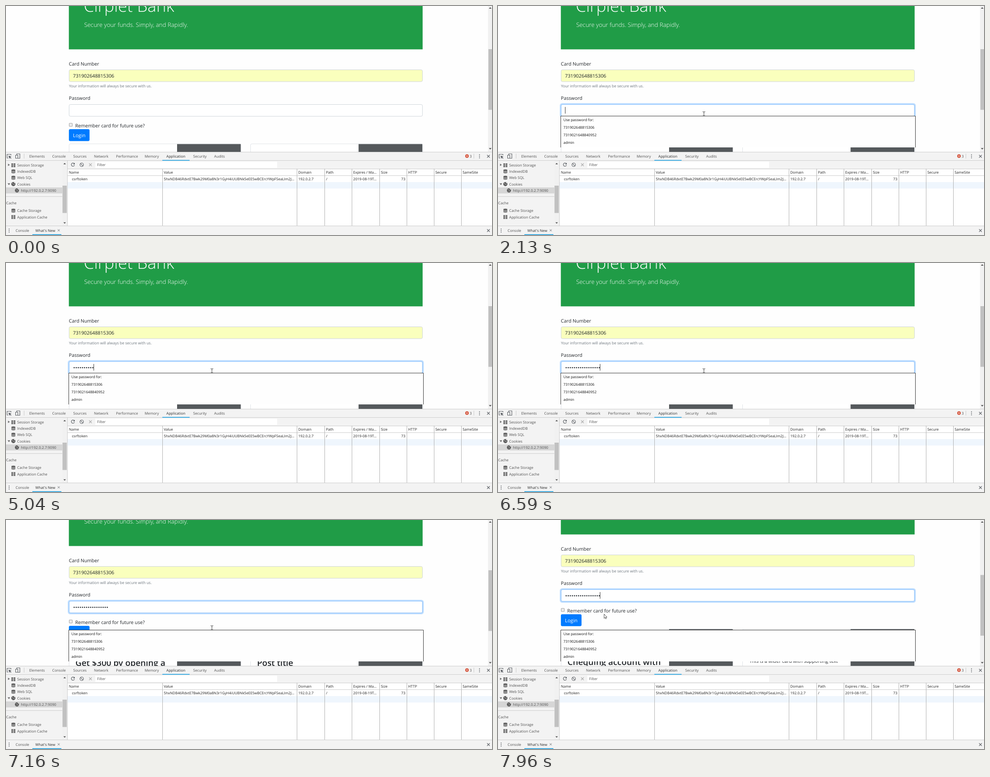
An HTML page that plays this animation: 1088 by 515 pixels, repeating every 8000 ms.

```html
<!DOCTYPE html>
<html lang="en">
<head>
<meta charset="utf-8">
<title>Login page with developer tools</title>
<style>
html, body { margin: 0; width: 100%; height: 100%; overflow: hidden; background: #fefefe; }
svg { display: block; width: 100vw; height: 100vh; font-family: "Open Sans", "Noto Sans", sans-serif; }
text { white-space: pre; text-rendering: geometricPrecision; }
.body { font-size: 10.7px; fill: #212529; }
.input { font-size: 10.75px; fill: #212529; }
.help { font-size: 8.53px; fill: #6c757d; }
.hero { font-weight: 300; fill: #fff; }
.title { font-size: 18.9px; font-weight: 600; fill: #212529; }
.field { fill: #fff; stroke: #ced4da; }
.card { fill: #fff; stroke: #dee2e6; }
.thumb { fill: #55595c; }
.bar { fill: #c1c1c1; }
.track { fill: #f1f1f1; }
.tri { fill: #505050; }
.panel { fill: #f3f3f3; }
.rule { stroke: #ccc; }
.icon { fill: none; stroke: #5f6368; stroke-width: 1.2; }
.tool { font-size: 8.14px; fill: #505050; }
.cell { font-size: 8.06px; fill: #222; }
.menu { font-size: 8.1px; fill: #111; }
.on { fill: #2a2a2a; }
.accent { fill: #1a9fe0; }
</style>
</head>
<body>
<svg viewBox="0 0 1088 515" preserveAspectRatio="none">
  <defs>
    <path id="store" fill="#5a5a5a" d="M0 2a4.5 1.8 0 0 1 9 0a4.5 1.8 0 0 1-9 0M0 3.3q4.5 2.6 9 0v1.6q-4.5 2.6-9 0zM0 6q4.5 2.6 9 0v1.7q-4.5 2.6-9 0z"/>
    <path id="grid" fill="#5a5a5a" d="M0 0h4v2.2h-4zM5 0h4v2.2h-4zM0 3h4v2.2h-4zM5 3h4v2.2h-4zM0 6h4v2.2h-4zM5 6h4v2.2h-4z"/>
    <g id="cookie">
      <circle cx="4.5" cy="4.5" r="4.5" fill="#4a4a4a"/>
      <g fill="#f3f3f3"><circle cx="3" cy="3" r=".9"/><circle cx="6" cy="5.6" r="1"/><circle cx="3" cy="6.3" r=".8"/><circle cx="6.8" cy="1.8" r="1.1"/></g>
    </g>
    <path id="close" d="M-3-3L3 3M3-3L-3 3"/>
    <g id="dots" fill="#5f6368"><circle cy="-3.6" r="1"/><circle r="1"/><circle cy="3.6" r="1"/></g>
  </defs>

  <rect width="1088" height="328" fill="#fefefe"/>
  <g id="page">
    <rect x="140.7" y="-120" width="792" height="217.5" fill="#209c47"/>
    <text class="hero" x="174" y="13" font-size="37.3">Cirplet Bank</text>
    <text class="hero" x="175" y="47" font-size="13.35">Secure your funds. Simply, and Rapidly.</text>

    <text class="body" x="140.8" y="133.5">Card Number</text>
    <rect class="field" x="141.3" y="143.5" width="791" height="26.5" rx="3" style="fill:#faffbd"/>
    <text class="input" x="150" y="161.3">731902648815306</text>
    <text class="help" x="141" y="183.3">Your information will always be secure with us.</text>

    <text class="body" x="140.8" y="211.3">Password</text>
    <rect class="field" x="141.3" y="221.5" width="791" height="26.5" rx="3"/>
    <g id="focus">
      <rect x="139.8" y="220" width="794" height="29.5" rx="4" fill="none" stroke="#bfdeff" stroke-width="3"/>
      <rect x="141.3" y="221.5" width="791" height="26.5" rx="3" fill="none" stroke="#80bdff"/>
    </g>
    <line id="typed" x1="152.6" y1="235.4" y2="235.4" stroke="#343a40" stroke-width="2.9" stroke-linecap="round" stroke-dasharray="0 4.63"/>
    <rect id="caret" y="227" width="1" height="15" fill="#333"/>

    <rect x="141.5" y="263.8" width="7" height="7" rx=".5" fill="#ececec" stroke="#a0a0a0"/>
    <text class="body" x="155" y="272.8">Remember card for future use?</text>
    <rect x="140.8" y="277" width="46.2" height="26.7" rx="3" fill="#007bff"/>
    <text x="150" y="295" font-size="11" fill="#fff">Login</text>

    <rect class="card" x="141.3" y="310" width="384.5" height="180" rx="3"/>
    <rect class="thumb" x="383" y="310.5" width="142.5" height="178.5"/>
    <text class="title" x="155.5" y="367">Get $300 by opening a</text>
    <text class="title" x="155.5" y="391">Chequing account with</text>
    <rect class="card" x="547.5" y="310" width="385" height="180" rx="3"/>
    <rect class="thumb" x="789.3" y="310.5" width="142.7" height="178.5"/>
    <text class="title" x="562" y="367">Post title</text>
    <text class="body" x="563" y="386">This is a wider card with supporting text</text>
  </g>

  <g id="menu">
    <path d="M140.5 318V247.5H934.5V318" fill="#fefefe" stroke="#333"/>
    <text class="menu" x="146.5" y="259.2">Use password for:</text>
    <text class="menu" x="146.5" y="276.2">731902648815306</text>
    <text class="menu" x="146.5" y="293.2">7319021648840952</text>
    <text class="menu" x="146.5" y="310.3">admin</text>
  </g>

  <rect class="track" x="1079" width="9" height="328"/>
  <path class="tri" d="M1081 6l3-3.2 3 3.2zM1081 319.5l3 3.2 3-3.2z"/>
  <rect id="thumb" class="bar" x="1080" y="97" width="8" height="136.5"/>

  <g id="tools">
    <rect y="328" width="1088" height="187" class="panel"/>
    <rect x="138" y="366" width="950" height="128" fill="#fff"/>
    <rect x="138" y="396" width="950" height="14.5" fill="#eff6fd"/>
    <path class="rule" d="M0 328.5H1088M0 347.5H1088M138 366.5H1088M138 381.5H1088M0 494.5H1088M40.5 332V343M1047.5 332V343M137.5 348V494M0 428.5H126"/>

    <path class="icon" d="M11 336V333.5H2.5V342H5"/>
    <path d="M5.5 336.2L12.5 339 9.6 340.1 12 342.6 11 343.6 8.6 341.1 7.4 343.8Z" fill="#5f6368"/>
    <path class="icon" d="M24 335V332.5H31V342.5H27M21.5 335.5H26.5V342.5H21.5Z"/>
    <rect class="accent" x="350" y="346.3" width="61" height="1.6"/>
    <circle cx="1032" cy="337.5" r="4" fill="#d4533b"/>
    <use href="#close" transform="translate(1032 337.5) scale(.55)" stroke="#fff" stroke-width="1.8"/>
    <use href="#dots" x="1060" y="338"/>
    <use href="#close" x="1080" y="338" class="icon"/>

    <rect y="408" width="126" height="13.5" fill="#d6d6d6"/>
    <path d="M4.5 354.5L8.5 357.3 4.5 360ZM3.5 398.8H9.5L6.5 402.8Z" fill="#6e6e6e"/>
    <use href="#grid" x="12" y="354"/>
    <use href="#store" x="12" y="367.3"/>
    <use href="#store" x="12" y="381.5"/>
    <use href="#cookie" x="12" y="396"/>
    <use href="#cookie" x="20" y="410.2"/>
    <use href="#store" x="12" y="455.5"/>
    <use href="#grid" x="12" y="470.5"/>
    <rect class="track" x="126" y="348" width="11" height="146"/>
    <rect class="bar" x="126.5" y="404" width="9.5" height="61.5"/>
    <path class="tri" d="M128.5 356l2.8-3 2.8 3zM128.5 486.5l2.8 3 2.8-3z"/>

    <path class="icon" d="M153 354.7A3.7 3.7 0 1 0 153.4 358"/>
    <path d="M154 352.5V356.3H150.2Z" fill="#5f6368"/>
    <g class="icon"><circle cx="169.5" cy="357" r="4"/><path d="M166.7 354.2L172.3 359.8"/></g>
    <use href="#close" x="189" y="357" class="icon" style="stroke:#aaa"/>
    <rect x="200" y="350" width="407" height="14" fill="#fff"/>

    <use href="#dots" x="7" y="505"/>
    <use href="#close" transform="translate(118 504.5) scale(.75)" class="icon"/>
    <use href="#close" x="1080" y="505" class="icon"/>
    <rect class="accent" x="59" y="513.4" width="65" height="1.6"/>
  </g>

  <path id="arrow" d="M.5.5V10.2L2.7 8.1 4.2 11.3 5.6 10.7 4.2 7.5H7Z" fill="#fff" stroke="#222" stroke-width=".8"/>
  <path id="beam" d="M-3-4.7H-1.2L0-4 1.2-4.7H3M0-4V4M-3 4.7H-1.2L0 4 1.2 4.7H3" fill="none" stroke="#333" stroke-width="1"/>
</svg>
<script>
const LOOP = 8000, PITCH = 4.63;
const el = id => document.getElementById(id);
const tools = el('tools');

function add(tag, attrs) {
  const node = document.createElementNS('http://www.w3.org/2000/svg', tag);
  for (const name in attrs) node.setAttribute(name, attrs[name]);
  tools.append(node);
  return node;
}

function label(cls, x, y, str, anchor = 'start') {
  add('text', { class: cls, x, y, 'text-anchor': anchor }).textContent = str;
}

[['Elements', 52], ['Console', 103.5], ['Sources', 150.5], ['Network', 197], ['Performance', 246.3],
 ['Memory', 310.5], ['Application', 359], ['Security', 419], ['Audits', 466], ['3', 1038]]
  .forEach(([s, x]) => label(s === 'Application' ? 'tool on' : 'tool', x, 341, s));

[['Session Storage', 25, 360.8], ['IndexedDB', 25, 375], ['Web SQL', 25, 389.2], ['Cookies', 25, 403.5],
 ['http://192.0.2.7:9090', 33.5, 417.6], ['Cache', .5, 445.8], ['Cache Storage', 25, 463.2],
 ['Application Cache', 25, 477.5], ['Filter', 204, 360], ['Console', 21.5, 508]]
  .forEach(([s, x, y]) => label('tool', x, y, s));
label('tool on', 65.8, 508, "What's New");

const columns = [['Name', 138], ['Value', 350.5], ['Domain', 651.5], ['Path', 713.5], ['Expires / Ma...', 774.5],
  ['Size', 836.5], ['HTTP', 897.5], ['Secure', 958.5], ['SameSite', 1019.5]];
add('path', { d: columns.slice(1).map(c => `M${c[1]} 366V494`).join(''), stroke: '#b0b0b0' });
columns.forEach(([s, x]) => label('cell', x + 2.7, 377, s));

[['csrftoken', 147.5], ['5hxNDB46RdvtE7Bwk29M0a8N3r1GyH4iUUBNk5eEE5wBCErcYWpFSeaLIm2J...', 353.3],
 ['192.0.2.7', 654.5], ['/', 716.5], ['2019-08-19T...', 777.3]]
  .forEach(([s, x]) => label('cell', x, 392, s));
label('cell', 894, 392, '73', 'end');

// Key press times of the password
const keys = [2670, 2940, 3490, 3690, 4030, 4240, 4350, 4640, 4890, 5040, 5240, 5490, 5740, 5940, 6090, 6290, 6590];
// Scroll offset, one value per 50 ms from 7110
const scrolls = [14, 39, 54, 61, 65];
// Pointer path: time, x, y
const path = [
  [360, 974, 504], [510, 782, 431], [710, 782, 431], [910, 510, 301], [1070, 510, 301],
  [1260, 480, 272], [1410, 466, 253], [1510, 463, 246], [1610, 462, 242], [1710, 464, 245],
  [1810, 464, 245], [1860, 455, 238], [1910, 461, 242], [7360, 461, 242], [7610, 330, 226],
  [7810, 262, 214], [7910, 244, 211], [7960, 237, 211]
];

function pointer(t) {
  const i = path.findIndex(p => p[0] > t);
  if (i < 0) return path[path.length - 1].slice(1);
  const [t0, x0, y0] = path[i - 1], [t1, x1, y1] = path[i];
  const k = (t - t0) / (t1 - t0);
  return [Math.round(x0 + (x1 - x0) * k), Math.round(y0 + (y1 - y0) * k)];
}

const show = (id, on) => { el(id).style.display = on ? '' : 'none'; };
const move = (id, x, y) => el(id).setAttribute('transform', `translate(${x} ${y})`);

function draw(t) {
  const step = Math.floor((t - 7110) / 50);
  const scroll = step < 0 ? 0 : scrolls[Math.min(step, scrolls.length - 1)];
  move('page', 0, -scroll);
  move('thumb', 0, scroll * .41);

  show('focus', t >= 2080);
  el('focus').style.opacity = t < 2130 ? .5 : 1;
  show('menu', t >= 2130);

  const count = keys.filter(k => k <= t).length;
  show('typed', count);
  el('typed').setAttribute('x2', 152.7 + PITCH * (count - 1));
  el('caret').setAttribute('x', Math.round(149.6 + PITCH * count));
  show('caret', t >= 2080 && !(t >= 2420 && t < 2670) && !(t >= 7110 && t < 7610));

  const tick = Math.floor((t - 10) / 50) * 50 + 10;
  const visible = tick >= 360;
  const [x, y] = visible ? pointer(tick) : [0, 0];
  const beam = y < 250 && tick <= 7360;
  show('arrow', visible && !beam);
  show('beam', visible && beam);
  move('arrow', x, y);
  move('beam', x, y + .5);
}

const start = performance.now();
function frame() {
  draw((performance.now() - start) % LOOP);
  requestAnimationFrame(frame);
}
frame();
</script>
</body>
</html>
```
